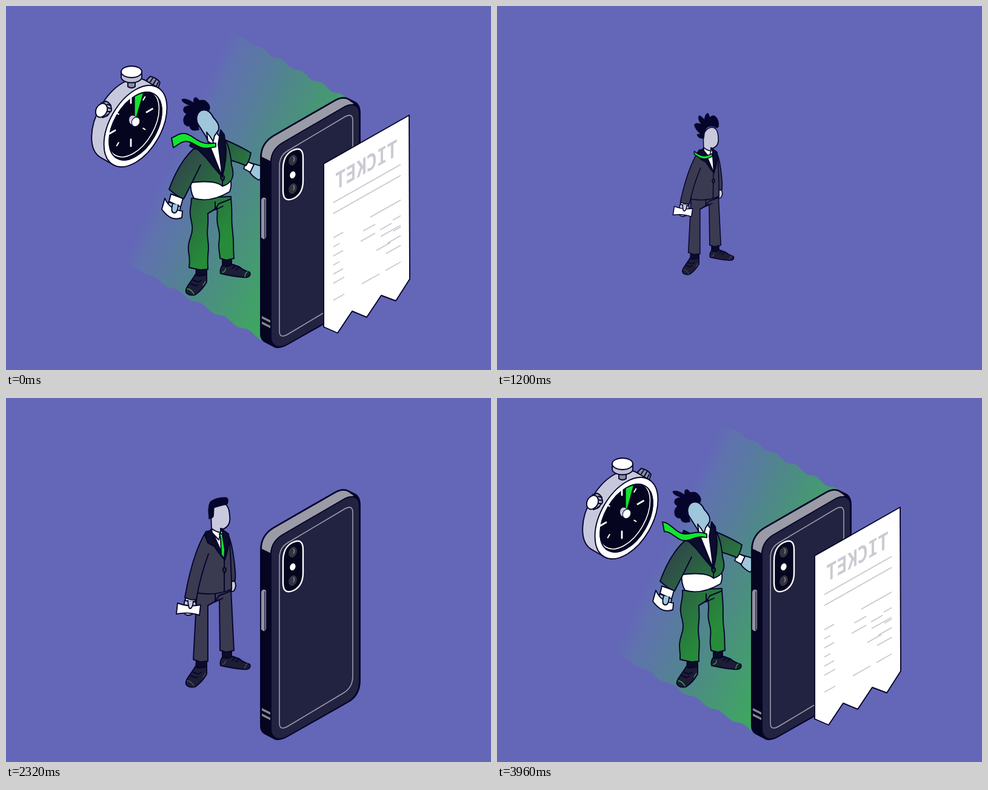
An HTML page that plays this animation: 800x600 px, repeating every 4 s.

```html
<!DOCTYPE html>
<html lang="en">
<head>
<meta charset="utf-8">
<title>Ticket rush</title>
<style>
html, body { margin: 0; width: 100%; height: 100%; overflow: hidden; background: #6466b8; }
svg { display: block; width: 100vw; height: 100vh; }
.ink { stroke: #05052b; stroke-width: 1.9; stroke-linejoin: round; stroke-linecap: round; }
.iso * { vector-effect: non-scaling-stroke; }
.none { fill: none; }
</style>
</head>
<body>
<svg viewBox="0 0 800 600">
  <defs>
    <linearGradient id="beamFill" gradientUnits="userSpaceOnUse" x1="320" y1="137" x2="544" y2="241">
      <stop offset="0" stop-color="#6072b2" stop-opacity="0"/>
      <stop offset=".12" stop-color="#5c7aa8" stop-opacity=".6"/>
      <stop offset=".5" stop-color="#50868c"/>
      <stop offset="1" stop-color="#3fa562"/>
    </linearGradient>
    <linearGradient id="cloth" gradientUnits="userSpaceOnUse" x1="280" y1="235" x2="400" y2="330">
      <stop id="cloth0"/><stop id="cloth1" offset="1"/>
    </linearGradient>
    <clipPath id="dialClip"><circle r="50"/></clipPath>
  </defs>
  <rect width="800" height="600" fill="#6466b8"/>
  <path id="beam" fill="url(#beamFill)"/>

  <g id="watch" class="ink">
    <path d="M232 122l6-6q10 2 16 10l-3 9q-8 2-14-3z" fill="#8c8ca4"/>
    <path class="none" d="M238 125l4-6M243 129l4-7M248 132l3-6"/>
    <g class="iso" transform="matrix(.866 -.5 0 1 213.500 198)">
      <path fill="#c8c8dc" d="M42.4-42.4l-25-25A60 60 0 0 0-67.4 17.4l25 25z"/>
      <circle r="60" fill="#fff"/>
      <circle r="50" fill="#05051f"/>
      <g clip-path="url(#dialClip)">
        <path id="wedge" fill="#12e52c" stroke="none"/>
        <circle cx="-4" cy="-6" r="49" fill="none" stroke="#fff" stroke-width="1.6"/>
      </g>
      <circle r="50" fill="none"/>
    </g>
    <g id="ticks" class="iso" transform="matrix(.866 -.5 0 1 206 190)"></g>
    <ellipse cx="209" cy="188" rx="6.5" ry="8" fill="#c8c8dc" stroke-width="1"/>
    <ellipse cx="214" cy="191" rx="6.5" ry="8" transform="rotate(25 214 191)" fill="#fff" stroke-width="1"/>
    <path d="M157 160l8-3q9 3 9 15l-7 9-8 3z" fill="#a9a9c2"/>
    <path class="none" d="M167 162l6 2M168 168l6 1M167 174l6 0M166 180l3-1"/>
    <ellipse cx="157.500" cy="172" rx="9" ry="12" transform="rotate(28 157.500 172)" fill="#fff"/>
    <path d="M201 122v11q6 4 12 0v-11z" fill="#8c8ca4"/>
    <path d="M190 108v9a17 9.500 0 0 0 34 0v-9z" fill="#bdbdd2"/>
    <ellipse cx="207" cy="108.500" rx="17" ry="9.500" fill="#fff"/>
  </g>

  <g id="man" class="ink">
    <g fill="#0c0c2a">
      <path d="M314 431h17v14q-9 4-18 0zM357 416h15v13q-7 4-15 0z"/>
      <path fill="#1d1d35" d="M312 443C308 451 300 459 297 467C295 475 303 478 312 476C318 472 326 464 331 455L331 442Q322 447 312 443z"/>
      <path fill="#1d1d35" d="M357 427C353 432 353 438 354 441Q375 446 390 447C402 449 404 443 402 439Q392 436 385 430L374 426Q365 431 357 427z"/>
      <path class="none" d="M309 452l8 3 5-3M305 458l8 3 4-2M373 433l4-4M379 435l5-4"/>
      <path id="trim" class="none" stroke-width="1.300" d="M299 466q7 1 11 9M325 460l4-6M394 446q0-5 4-8M357 439q5-1 5-6"/>
    </g>
    <path id="legs" fill="url(#cloth)"/>
    <path class="none" d="M371 318L351 326L345 335L333 342M345 323V335M358 330L345 336"/>
    <g id="top"><g id="back"></g><g id="arm"></g><g id="front"></g></g>
  </g>

  <g id="phone" class="ink">
    <path fill="#05051f" d="M420 250C420 232 430 220 442 213L543 155Q556 148 565 153L577 159Q584 164 584 176V465C584 485 575 496 563 502L462 559Q451 565 443 562L426 553Q420 549 420 541z"/>
    <path fill="#9b9ba7" d="M421 249C421 232 430 221 442 214L543 156Q556 149 565 154L575 161L455 230Q437 239 437 257z"/>
    <path fill="#222241" d="M437 258C437 243 444 233 455 226L555 168C570 159 583 161 583 178V465C583 485 574 496 562 502L462 559C448 566 437 560 437 545z"/>
    <path class="none" stroke="#9c9cab" stroke-width="1.600" d="M451 264Q451 247 464 239L560 182Q572 176 572 189V458Q572 477 557 486L465 541Q451 549 451 536z"/>
    <path fill="#05051f" stroke="#fff" stroke-width="2.400" d="M457 268Q457 247 471 239Q490 229 490 250V288Q490 309 475 317Q457 325 457 305z"/>
    <g stroke="none">
      <ellipse cx="473" cy="254" rx="6.500" ry="9" transform="rotate(20 473 254)" fill="#33333f"/>
      <ellipse cx="473" cy="301" rx="6.500" ry="9" transform="rotate(20 473 301)" fill="#33333f"/>
      <ellipse cx="473" cy="278.500" rx="4.500" ry="6" transform="rotate(20 473 278)" fill="#fff"/>
    </g>
    <path class="none" stroke="#8e8e9c" stroke-width="1.300" d="M474 249q3 3 0 7M474 296q3 3 0 7"/>
    <path fill="#92929f" d="M420 320Q421 314 427 315L430 317V380Q429 386 424 385L420 382z"/>
    <path class="none" stroke-width="1.200" d="M427 319V383"/>
    <path fill="#85858f" stroke="none" d="M422 511l14 7v4l-14-7zM422 520l14 7v4l-14-7z"/>
  </g>

  <g id="ticket">
    <path class="ink" fill="#fff" d="M524 260L665 180L666 450L643 486L619 477L595 513L571 503L547 539L524 529z"/>
    <text transform="matrix(-.75 .42 0 1 645.600 246.200)" font-family="'Noto Sans Mono', 'DejaVu Sans Mono', monospace" font-size="38" font-weight="600" fill="#cbcbd3">TICKET</text>
    <path id="rows" fill="none" stroke="#c6c6ce" stroke-width="1.600"/>
  </g>
</svg>
<script>
const LOOP = 4000, NAVY = '#05052b';
const $ = id => document.getElementById(id);
const set = (el, name, v) => el.setAttribute(name, v);
const lerp = (a, b, k) => a + (b - a) * k;
const num = v => v.toFixed(2);

// Eased value at time t through a list of [time, value] stops.
function key(t, stops) {
  if (t <= stops[0][0]) return stops[0][1];
  for (let i = 1; i < stops.length; i++) {
    const [t0, a] = stops[i - 1], [t1, b] = stops[i];
    if (t < t1) return lerp(a, b, (1 - Math.cos(Math.PI * (t - t0) / (t1 - t0))) / 2);
  }
  return stops[stops.length - 1][1];
}

// Blends two paths that share the same commands.
function morph(a, b, k) {
  const to = b.match(/-?[\d.]+/g);
  let i = 0;
  return a.replace(/-?[\d.]+/g, n => num(lerp(+n, +to[i++], k)));
}

function tint(a, b, k) {
  const part = (c, i) => parseInt(c.slice(i, i + 2), 16);
  return `rgb(${[1, 3, 5].map(i => Math.round(lerp(part(a, i), part(b, i), k)))})`;
}

function add(parent, fill) {
  const p = document.createElementNS('http://www.w3.org/2000/svg', 'path');
  set(p, 'fill', fill);
  return parent.appendChild(p);
}

// Each part: fill, calm pose, windy pose.
const CLOTH = 'url(#cloth)', LAPEL = '#0c0c2c';
const layers = {
  back: {
    farHand: ['skin', 'M372 298Q379 300 379 310Q377 320 372 319Q371 310 372 298z',
      'M400 258Q416 262 421 264Q424 284 417 287Q405 281 398 268z'],
    farCuff: ['#fff', 'M371 296L378 298L378 301L371 300z', 'M397 256L409 261L403 274L392 268z'],
    farArm: [CLOTH, 'M366 225Q374 240 378 285Q379 297 377 302Q372 303 368 300L360 240',
      'M362 221Q386 231 404 242Q402 254 396 263Q384 258 370 254L358 245'],
    belly: ['#fff', 'M320 290Q320 305 319 318Q345 322 368 312Q370 300 366 285z',
      'M305 288Q303 305 310 317Q337 325 369 306Q373 295 370 285z'],
    coat: [CLOTH, 'M330 220Q318 250 314 321Q345 327 372 315Q372 285 369 240Q366 222 357 217z',
      'M309 236Q302 262 305 291Q345 286 357 297Q381 290 372 262Q370 235 362 221z']
  },
  arm: {
    hand: ['skin', 'M295 333Q300 331 312 335Q316 345 311 354Q300 362 294 355Q292 345 295 333z',
      'M268 323Q275 325 288 330Q288 338 283 342Q278 345 272 340Q266 330 268 323z'],
    cuff: ['#fff', 'M296 329L313 332L311 336L296 334z', 'M272 310L292 317L288 331L269 322z'],
    sleeve: [CLOTH, 'M330 220Q308 255 295 329Q305 334 314 332Q320 295 334 257',
      'M309 236Q285 258 269 302Q282 314 293 318Q305 295 321 262'],
    paper: ['#fff', 'M283 338Q302 345 321 341L319 358Q301 352 281 356z',
      'M262 317Q270 336 291 338L290 349Q272 356 257 335z'],
    thumb: ['skin', 'M300 334Q301 348 304 347Q308 346 309 335', 'M275 326Q271 340 277 341Q283 342 284 328']
  },
  front: {
    seam: ['none', 'M360 267L360 318', 'M357 282L357 296'],
    button: ['#2a2a40', 'M358 281Q360 278 363 281Q363 286 361 288Q357 287 358 281z',
      'M354 281Q357 277 360 281Q361 285 358 288Q354 287 354 281z'],
    shirt: ['#fff', 'M339 217L361 267L358 222L352 215z', 'M328 210L356 280L352 215L345 206z'],
    lapelL: [LAPEL, 'M339 216L328 226L333 239L344 245Q352 258 361 267L341 224z',
      'M308 218L303 231L318 238L330 250Q342 266 356 281L335 231z'],
    lapelR: [LAPEL, 'M357 217L367 224L368 236Q366 252 361 267L358 232z',
      'M354 204L360 212L363 236Q363 260 357 281L350 228z'],
    head: ['skin', 'M339 216L338 190Q342 176 354 173Q368 172 369 195Q371 211 358 216L354 215L354 222Q345 221 339 216z',
      'M333 220L315 192Q312 180 321 172Q335 168 342 184Q354 196 350 205L344 214L342 222Q336 223 333 220z'],
    collar: ['#fff', 'M339 215Q345 220 354 222L351 234L340 222z', 'M331 208Q337 215 341 222L343 229L333 223z'],
    hair: [NAVY, 'M339 196Q327 197 325 188Q328 187 333 187Q322 180 319 168Q323 163 334 167Q326 158 328 150Q332 148 340 158Q341 145 347 144Q349 146 351 153Q356 147 362 150Q371 158 369 172Q365 176 360 171Q345 168 341 181z',
      'M318 204Q304 208 303 198Q294 199 293 190Q292 183 298 178Q290 174 294 167Q298 164 305 164Q290 160 290 154Q297 151 310 160Q308 150 314 151Q317 153 319 156Q328 153 333 160Q338 166 335 172Q320 168 314 182z'],
    tie: ['#12e52c']
  }
};
const NEAT_HAIR = 'M335 199Q332 180 337 171Q347 163 364 164Q368 167 365 175Q352 178 343 181Q343 190 342 196Q339 200 335 199z';
const NEAT_TIE = 'M352 224L357 224L358 232L361 250L360 265L355 258L354 232z';
const parts = Object.assign({}, ...Object.values(layers));
const shape = {};
for (const layer in layers)
  for (const name in layers[layer]) shape[name] = add($(layer), parts[name][0]);
set(shape.hair, 'stroke-width', 1);

// Dial marks: longer on the quarters.
for (let i = 0; i < 8; i++) {
  const a = i * Math.PI / 4, r = i % 2 ? 33 : 30, end = i % 2 ? 38 : 41;
  const p = add($('ticks'), 'none');
  set(p, 'd', `M${num(r * Math.sin(a))} ${num(-r * Math.cos(a))}L${num(end * Math.sin(a))} ${num(-end * Math.cos(a))}`);
  set(p, 'stroke', '#fff');
  set(p, 'stroke-width', i % 2 ? 2 : 2.8);
}

// Receipt rows: from x, to x, height at the left end.
const rows = [
  [540, 651, 324], [540, 651, 342], [601, 651, 348], [638, 651, 353], [617, 636, 369],
  [589, 609, 371], [585, 609, 388], [618, 651, 380], [629, 651, 391], [611, 634, 403],
  [639, 651, 371], [627, 651, 408], [540, 556, 382], [540, 550, 397], [540, 556, 412],
  [540, 550, 427], [540, 556, 442], [540, 558, 457], [540, 558, 485], [587, 616, 458], [626, 651, 436]
];
set($('rows'), 'd', rows.map(([a, b, y]) => `M${a} ${y}L${b} ${num(y - 0.565 * (b - a))}`).join(''));

const line = pts => 'M' + pts.map(p => num(p[0]) + ' ' + num(p[1])).join('L');
const span = (n, f) => Array.from({ length: n + 1 }, (_, i) => f(i / n));

function beamPath(ph) {
  const wave = (s, o) => 2.6 * Math.sin(s * 38 + ph + o) * Math.min(1, s * 4);
  const top = span(60, s => [lerp(365, 564, s), lerp(38, 154, s) + wave(s, 0)]);
  const low = span(60, s => [lerp(190, 424, s), lerp(418, 550, s) + wave(s, 2)]).reverse();
  return line(top.concat(low)) + 'z';
}

function legsPath(k, ph) {
  const edge = (x0, x1, y0, y1, amp, o) => span(14, s => [
    lerp(x0, x1, s) + k * amp * Math.sin(s * 11 + ph + o) * Math.sin(Math.PI * s),
    lerp(y0, y1, s)
  ]);
  return line([
    ...edge(lerp(315, 306, k), lerp(309, 302, k), 317, 431, 3.2, 3),
    [320, 435], ...edge(333, 333, 342, 434, 1, 1).reverse(),
    ...edge(lerp(352, 348, k), 353, 332, 416, 1.5, 2),
    [364, 419], ...edge(371, 376, 314, 416, 0.6, 0).reverse()
  ]) + 'z';
}

function tiePath(k, ph) {
  const mid = s => [
    lerp(357 - 37 * s, 346 - 73 * s, k),
    lerp(230 + 7 * Math.sin(Math.PI * s) - 4 * s,
      229 - 9 * s + (2 + 6 * s) * Math.sin(s * 7 + ph), k)
  ];
  const half = s => lerp(3, 3 + 5 * s, k);
  const up = span(24, s => [mid(s)[0], mid(s)[1] - half(s)]);
  const down = span(24, s => [mid(s)[0] + 3 * k * s, mid(s)[1] + half(s)]).reverse();
  return line(up.concat(down)) + 'z';
}

function wedgePath(deg) {
  const a = deg * Math.PI / 180;
  return `M-1-9V-69A60 60 0 0 1 ${num(-1 + 60 * Math.sin(a))} ${num(-9 - 60 * Math.cos(a))}z`;
}

function draw(t) {
  const k = t < 2000 ? key(t, [[400, 1], [560, 0]]) : key(t, [[3460, 0], [3640, 1]]);
  const neat = t >= 1320 && t < 3480;
  const ph = t / 250 * 2 * Math.PI;

  const lean = t < 1320 ? 0.8 : key(t, [[2900, 0], [3060, 5.3]]);
  const swing = t < 1320 ? 1.4 : 0;
  const size = key(t, [[1120, 1], [1200, 0.8], [1300, 1.1], [1360, 1.08], [1520, 1]]);
  const watchX = t < 2000
    ? key(t, [[600, 0], [740, 2], [1080, -275]])
    : key(t, [[3080, -275], [3360, 12], [3520, -14], [3680, 0]]);
  const watchY = t < 2000 ? key(t, [[740, 0], [1080, -28]]) : 0;
  const phoneX = t < 1440
    ? key(t, [[720, 0], [820, -12], [1120, 390]])
    : key(t, [[1760, 385], [2120, -16], [2320, 0]]);
  const ticketY = t < 2000
    ? key(t, [[560, 0], [780, 453]])
    : key(t, [[2320, 430], [2680, -26], [2880, 0]]);

  set($('watch'), 'transform', `translate(${num(watchX)} ${num(watchY)})`);
  set($('phone'), 'transform', `translate(${num(phoneX)} 0)`);
  set($('ticket'), 'transform', `translate(0 ${num(ticketY)})`);
  set($('man'), 'transform', `translate(342 307) scale(${size.toFixed(4)}) translate(-342 -307)`);
  set($('top'), 'transform', `rotate(${num(lean * (1 - k))} 340 322)`);
  set($('arm'), 'transform', `rotate(${num(swing * (1 - k))} 332 225)`);

  const clock = t < 2000 ? t : t - LOOP;
  set($('wedge'), 'd', wedgePath(Math.max(0, 22 + clock * 0.05)));

  set($('beam'), 'd', beamPath(ph));
  set($('beam'), 'opacity', num(k));
  set($('cloth0'), 'stop-color', tint('#3a3a51', '#303f4b', k));
  set($('cloth1'), 'stop-color', tint('#3a3a51', '#268c39', k));
  set($('trim'), 'stroke', tint('#50505f', '#2fb045', k));
  set($('legs'), 'd', legsPath(k, ph));

  const skin = tint('#c9c9dd', '#9fc6da', k);
  for (const name in parts) {
    const [fill, calm, windy] = parts[name];
    if (fill === 'skin') set(shape[name], 'fill', skin);
    if (calm) set(shape[name], 'd', morph(calm, windy, k));
  }
  if (neat) set(shape.hair, 'd', NEAT_HAIR);
  set(shape.tie, 'd', neat ? NEAT_TIE : tiePath(k, ph * 2));
}

function frame(now) {
  draw(now % LOOP);
  requestAnimationFrame(frame);
}
draw(0);
requestAnimationFrame(frame);
</script>
</body>
</html>
```
